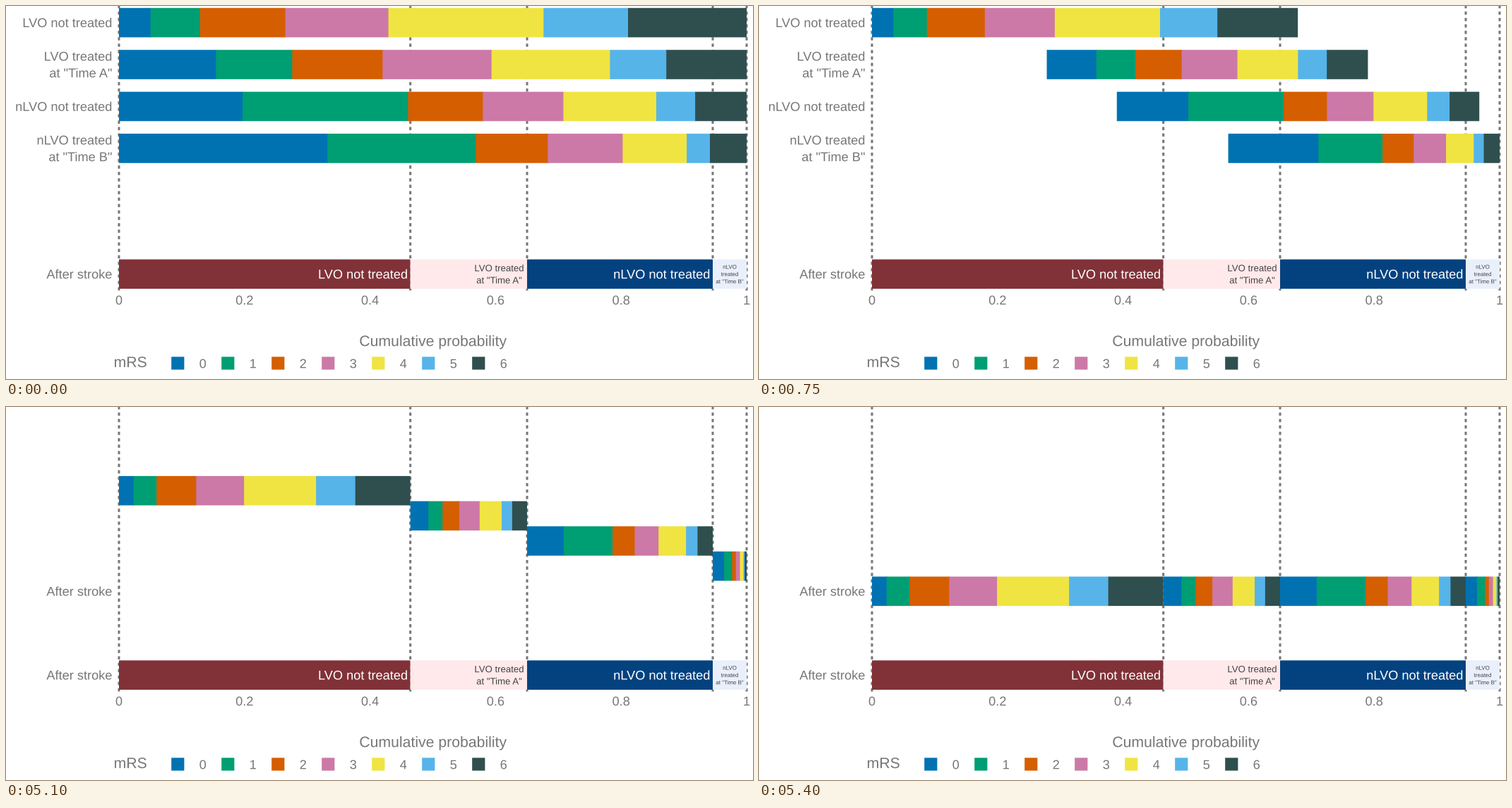
Write a matplotlib script that moves like this. It is 1058 by 529 pixels and loops after 8000 ms.

```python
import matplotlib.pyplot as plt
import numpy as np
from matplotlib.animation import FuncAnimation
from matplotlib.patches import PathPatch, Rectangle
from matplotlib.path import Path
from matplotlib.textpath import TextPath

W, H, DPI = 1058, 529, 100
SCALE = 1.516
FONT, BIG_FONT, DASH = 12 * SCALE, 14 * SCALE, 3 * SCALE
LEFT, SPAN = 160, 889
ROW_TOP, ROW_STEP = 23.6, 59.43
BAR_H = .7 * ROW_STEP
GREY = "#777777"
COLORS = ["#0072B2", "#009E73", "#D55E00", "#CC79A7", "#F0E442", "#56B4E9", "#2F4F4F"]

# Cumulative mRS probabilities of each group, and the groups' shares of the whole
CUMULATIVE = np.array([
    [0, .0502, .129, .265, .4292, .6764, .811, 1],
    [0, .1545, .276, .420, .5935, .7822, .872, 1],
    [0, .1970, .4605, .5797, .708, .856, .918, 1],
    [0, .3322, .5685, .6832, .8025, .9045, .9415, 1],
])
EDGES = np.array([0, .4642, .6502, .946, 1])
FRAMES, INTERVAL = 160, 50
SQUEEZE_START, DROP_START, MOVE_FRAMES = 9, 98, 10

plt.rcParams["font.family"] = "Liberation Sans"
fig = plt.figure(figsize=(W / DPI, H / DPI), dpi=DPI, facecolor="white")
ax = fig.add_axes([0, 0, 1, 1])
ax.set(xlim=(0, W), ylim=(H, 0))
ax.axis("off")


def to_x(p):
    return LEFT + SPAN * p


def row_y(row):
    return ROW_TOP + ROW_STEP * row


def rect(x, y, w, h, color):
    return ax.add_patch(Rectangle((x, y), w, h, fc=color, lw=0, snap=False, zorder=3))


def advance(text, size):
    """Width of the text including its side bearings."""
    ends = [TextPath((0, 0), s, size=size).get_extents().x1 for s in (text + "|", "|")]
    return ends[0] - ends[1]


def label(x, y, lines, size=FONT, color=GREY, align=1):
    """Outline lines of text around height y; align is 0 left, 0.5 centre, 1 right."""
    items = lines.split("\n")
    patches = []
    for i, line in enumerate(items):
        outline = TextPath((0, 0), line, size=size)
        origin = [x - align * advance(line, size),
                  y + size * (.35 + 1.3 * (i - (len(items) - 1) / 2))]
        path = Path(outline.vertices * [1, -1] + origin, outline.codes)
        patches.append(ax.add_patch(PathPatch(path, fc=color, lw=0, snap=False, zorder=4)))
    return patches


# Group boundaries
for edge in EDGES:
    ax.plot([to_x(edge)] * 2, [403.5, -10], color=GREY, lw=2 * SCALE * 72 / DPI,
            ls=(0, (1.5, 1.5)), dash_capstyle="butt", snap=False, zorder=1)

# Bottom bar
base_y = row_y(6)
for start, end, color in zip(EDGES, EDGES[1:], ["#803238", "#FFE9EB", "#04427F", "#E9F0FB"]):
    rect(to_x(start), base_y - BAR_H / 2, SPAN * (end - start), BAR_H, color)
label(to_x(EDGES[1]) - 3.6, base_y, "LVO not treated", color="white")
label(698.5, base_y, 'LVO treated\nat "Time A"', 13.2, "#444444", .5)
label(to_x(EDGES[3]) - 3.6, base_y, "nLVO not treated", color="white")
label(1025, base_y, 'nLVO\ntreated\nat "Time B"', 7.95, "#444444", .5)
label(150.4, base_y, "After stroke")

# Axis and legend
for tick in np.arange(6) / 5:
    label(to_x(tick), 417, f"{tick:g}", align=.5)
label(604.7, 474.8, "Cumulative probability", BIG_FONT, align=.5)
label(152.6, 504.7, "mRS", BIG_FONT, align=0)
for i, color in enumerate(COLORS):
    rect(234.2 + 71 * i, 497.5, 12 * SCALE, 12 * SCALE, color)
    label(273.7 + 71 * i, 507, str(i), align=0)

# Moving rows
names = ["LVO not treated", 'LVO treated\nat "Time A"',
         "nLVO not treated", 'nLVO treated\nat "Time B"']
row_labels = [t for i, name in enumerate(names) for t in label(150.4, row_y(i), name)]
merged_labels = label(150.4, row_y(4), "After stroke")
bars = [[rect(0, 0, 0, BAR_H, color) for color in COLORS] for _ in names]


def progress(frame, start):
    return min(max((frame - start) / MOVE_FRAMES, 0), 1)


def update(frame):
    squeeze = progress(frame, SQUEEZE_START)
    drop = progress(frame, DROP_START)
    for i, segments in enumerate(bars):
        width = 1 + squeeze * (EDGES[i + 1] - EDGES[i] - 1)
        xs = to_x(squeeze * EDGES[i] + width * CUMULATIVE[i])
        y = row_y(i + drop * (4 - i)) - BAR_H / 2
        for segment, x0, x1 in zip(segments, xs, xs[1:]):
            # Run one pixel under the next segment so that no seam shows
            segment.set_bounds(x0, y, min(x1 + 1, xs[-1]) - x0, BAR_H)
    for text in row_labels:
        text.set_visible(drop == 0)
    for text in merged_labels:
        text.set_visible(drop > 0)
    return []


anim = FuncAnimation(fig, update, frames=FRAMES, interval=INTERVAL,
                     init_func=lambda: update(0), repeat=True, repeat_delay=0)
plt.show()
```
